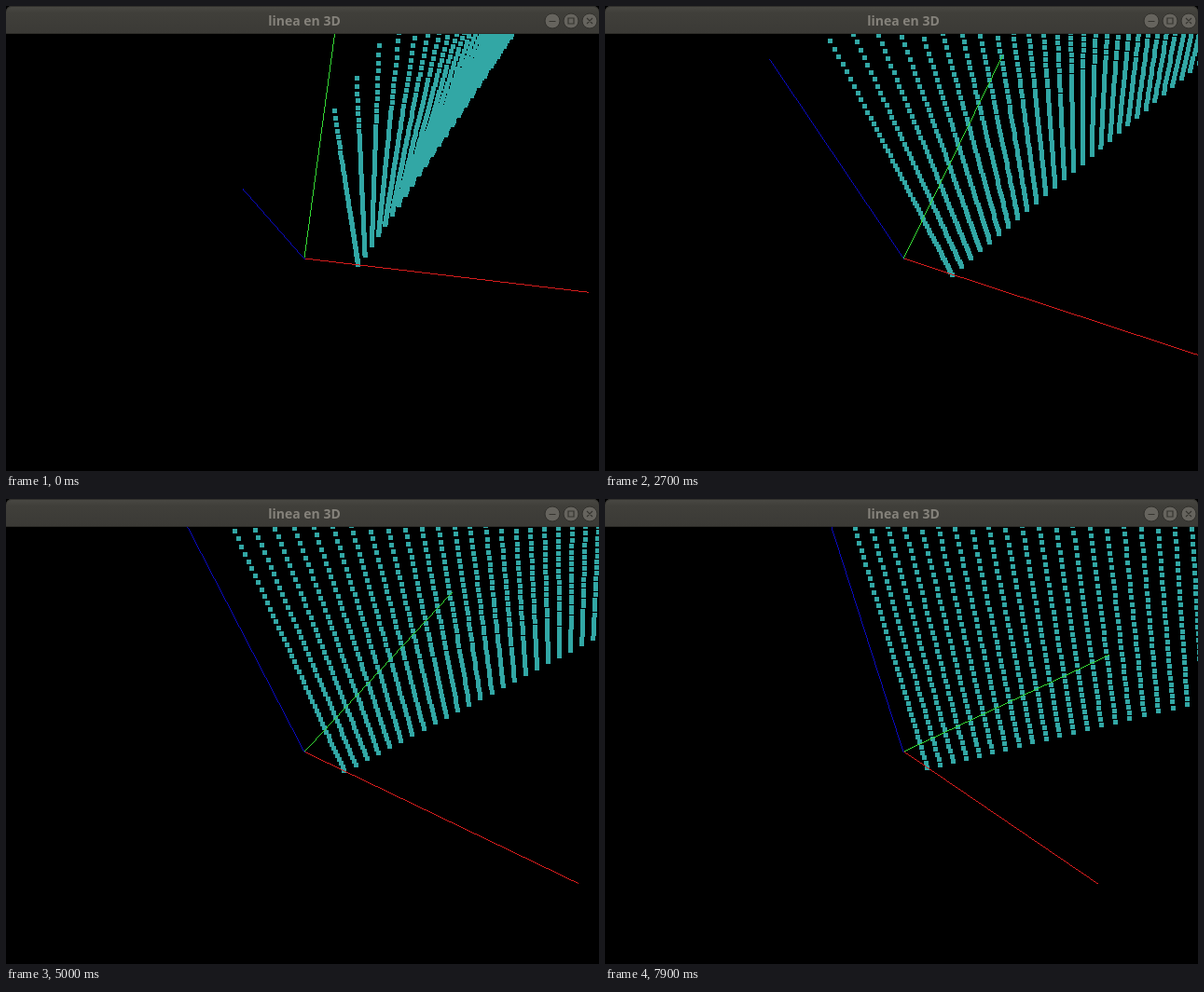
These frames come from a looping animation (636 by 499 pixels, 8 s). An HTML page with a canvas:

```html
<!DOCTYPE html>
<html lang="es">
<head>
<meta charset="utf-8">
<title>linea en 3D</title>
<style>
  html, body { margin: 0; width: 100%; height: 100%; overflow: hidden; background: #000; }
  canvas { position: absolute; left: 0; top: 0; clip-path: inset(30px 0 0); }
  .bar {
    position: absolute; left: 0; top: 0; width: 636px; height: 30px;
    box-sizing: border-box; overflow: hidden;
    border-radius: 6px 6px 0 0; border-bottom: 1px solid #2d2c28;
    background: linear-gradient(#4a4944, #403f3a 25%, #3b3a36);
    box-shadow: inset 0 1px #33322e;
  }
  .title {
    position: absolute; left: 4px; width: 632px; top: 6px;
    font: bold 14px/20px "Noto Sans", "Open Sans", sans-serif;
    text-align: center; color: #85827b;
  }
  .bar svg { position: absolute; left: 576px; top: 6px; }
</style>
</head>
<body>
<canvas id="view" width="636" height="499"></canvas>
<div class="bar">
  <div class="title">linea en 3D</div>
  <svg width="60" height="20" fill="none" stroke="#35342f">
    <g fill="#66645e" stroke="#31302c">
      <circle cx="10" cy="10" r="8"/><circle cx="30" cy="10" r="8"/><circle cx="50" cy="10" r="8"/>
    </g>
    <path d="M6.5 10.5h7M27 7h6v6h-6zM47 7l6 6M53 7l-6 6" stroke-width="1.2"/>
  </svg>
</div>
<script>
const ctx = document.getElementById("view").getContext("2d");
const W = 636, H = 499, CX = 320, CY = 271;
const FOCAL = 240 / Math.tan(Math.PI / 8);   // 45° field of view, 480 px tall
const EYE = 10, AXIS = 5, LOOP = 8000, TICK = 100;
const COLUMNS = 40, DEPTH = 70, DOT = 5;

// [time, degrees]; the scene turns in half-degree steps at a nearly even pace
const turns = [[0, 12.5], [1900, 29.5], [2700, 37.5], [4000, 48.5], [5000, 57.5], [6800, 74], [7900, 83.5]];

function angleAt(t) {
  let i = 1;
  while (i < turns.length - 1 && t > turns[i][0]) i++;
  const [t0, a0] = turns[i - 1], [t1, a1] = turns[i];
  return Math.round(2 * (a0 + (a1 - a0) * (t - t0) / (t1 - t0))) / 2;
}

// Rotation about (-1, -1, -1), then perspective
function projector(deg) {
  const a = deg * Math.PI / 180, c = Math.cos(a);
  const m = (1 - c) / 3, n = Math.sin(a) / Math.sqrt(3);
  const d = c + m, p = m + n, q = m - n;
  return (x, y, z) => {
    const k = FOCAL / (EYE - (p * x + q * y + d * z));
    return [CX + k * (d * x + p * y + q * z), CY - k * (q * x + d * y + p * z)];
  };
}

function line([x0, y0], [x1, y1], color) {
  const dx = x1 - x0, dy = y1 - y0;
  const steps = Math.round(Math.max(Math.abs(dx), Math.abs(dy)));
  ctx.fillStyle = color;
  for (let i = 0; i < steps; i++) {
    ctx.fillRect(Math.floor(x0 + dx * i / steps), Math.floor(y0 + dy * i / steps), 1, 1);
  }
}

function draw(t) {
  const at = projector(angleAt(t));
  ctx.fillStyle = "#000";
  ctx.fillRect(0, 0, W, H);

  ctx.fillStyle = "#32a7a5";
  for (let j = 0; j < COLUMNS; j++) {
    for (let k = 0; k <= DEPTH; k++) {
      const [x, y] = at(1 + j / 10, j / 5, k / 10);
      ctx.fillRect(Math.round(x - DOT / 2), Math.round(y - DOT / 2), DOT, DOT);
    }
  }

  const origin = at(0, 0, 0);
  line(origin, at(AXIS, 0, 0), "#d41c1c");
  line(origin, at(0, AXIS, 0), "#34d834");
  line(origin, at(0, 0, AXIS), "#0a0abc");
}

const start = performance.now();
function frame() {
  const t = (performance.now() - start) % LOOP;
  draw(Math.floor(t / TICK) * TICK);
  requestAnimationFrame(frame);
}
frame();
</script>
</body>
</html>
```
